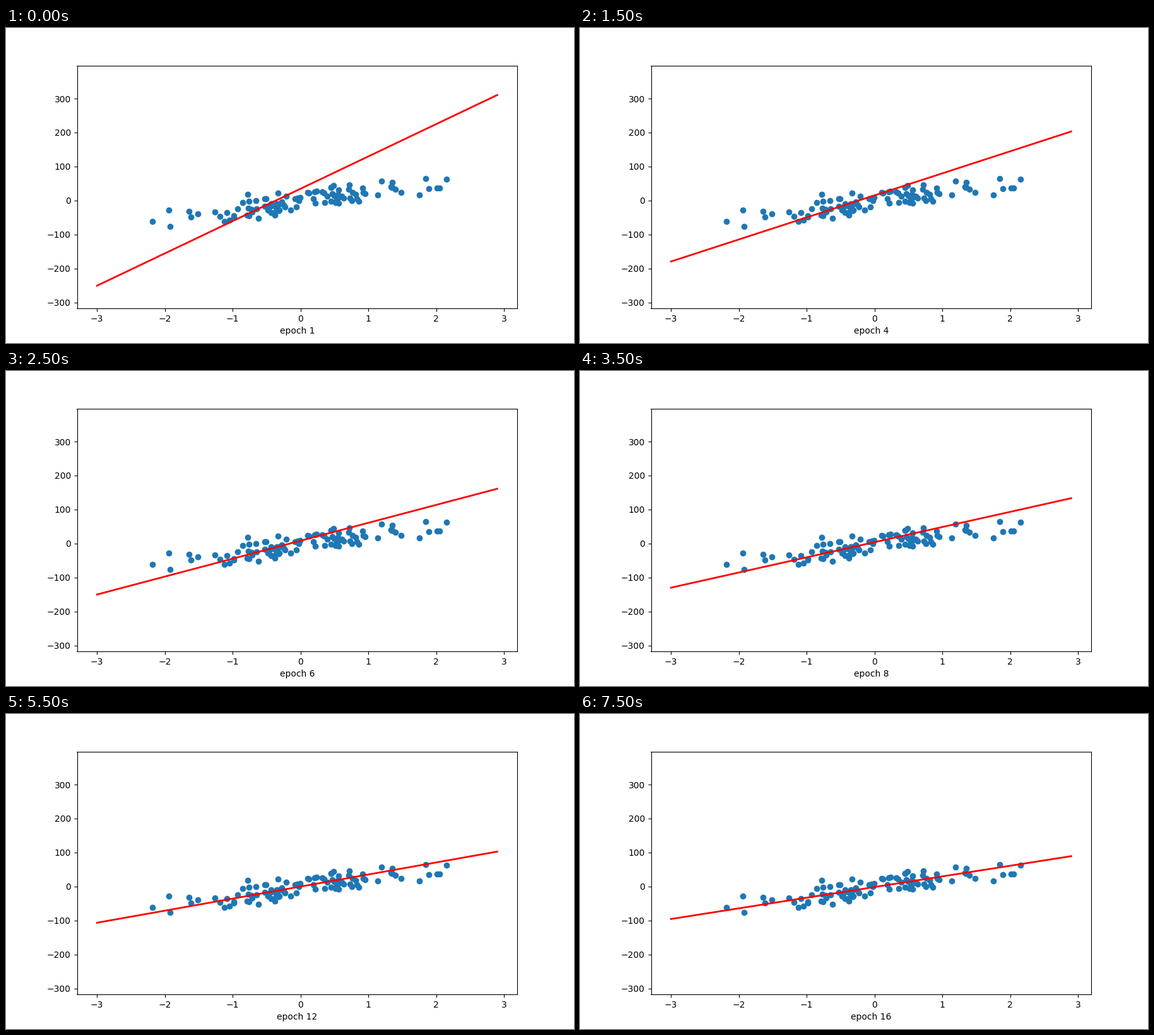
These frames come from a looping animation (900x500 px, 8000 ms). A matplotlib script:

```python
import matplotlib.pyplot as plt
import numpy as np
from matplotlib.animation import FuncAnimation

EPOCHS, STEP_MS = 16, 500
RATE = 0.001
SLOPE, INTERCEPT = 110, 45  # starting guess


def samples(n=100, noise=20, seed=13):
    """Noisy linear data with a random slope."""
    rng = np.random.RandomState(seed)
    x = rng.standard_normal(n)
    y = 100 * rng.uniform() * x
    return x, y + rng.normal(scale=noise, size=n)


def descend(x, y, m, b):
    """Batch gradient descent on the squared error, one fit per epoch."""
    fits = []
    for _ in range(EPOCHS):
        err = y - m * x - b
        m, b = m + 2 * RATE * np.sum(err * x), b + 2 * RATE * np.sum(err)
        fits.append((m, b))
    return fits


x, y = samples()
fits = descend(x, y, SLOPE, INTERCEPT)
xs = np.arange(-3, 3, 0.1)

fig, ax = plt.subplots(figsize=(9, 5), dpi=100)
ax.scatter(x, y)
# The starting guess sets the axis limits
line, = ax.plot(xs, SLOPE * xs + INTERCEPT, "r-", linewidth=2)


def update(i):
    m, b = fits[i]
    line.set_ydata(m * xs + b)
    ax.set_xlabel(f"epoch {i + 1}")
    return line,


anim = FuncAnimation(fig, update, frames=EPOCHS, interval=STEP_MS,
                     repeat=True, repeat_delay=0, blit=False)
plt.show()
```
